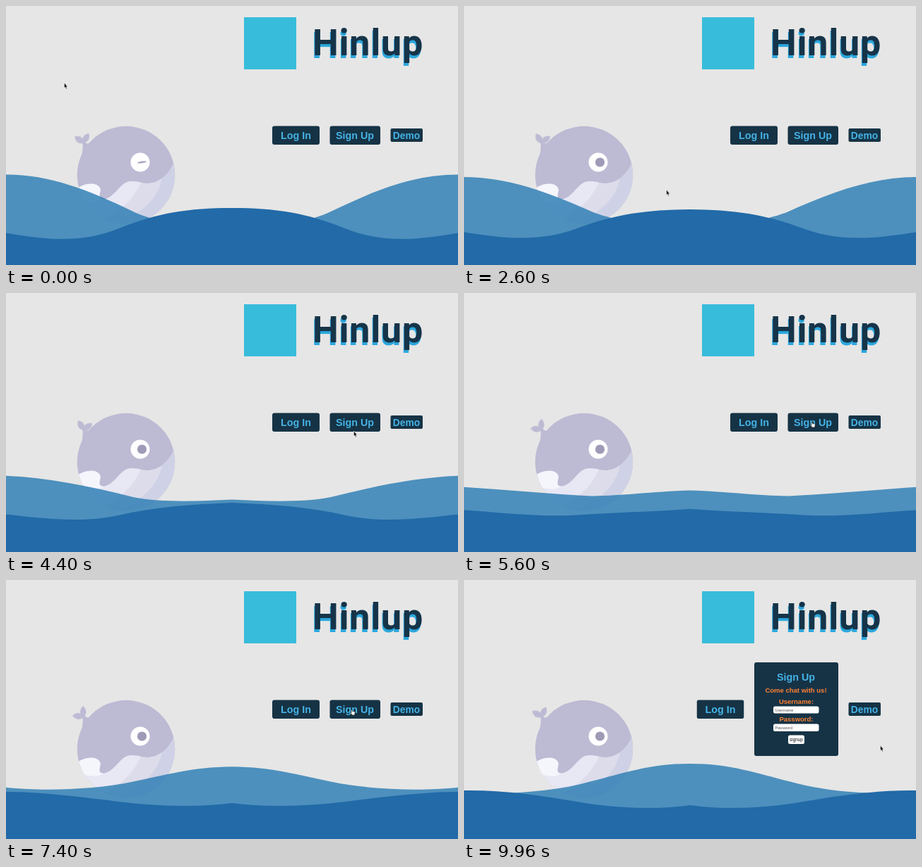
Animation of 640 by 368 pixels, one loop 10000 ms. Source, as an HTML page:

```html
<!DOCTYPE html>
<html lang="en">
<head>
<meta charset="utf-8">
<title>Hinlup</title>
<style>
  :root { --loop: 10s; }
  html, body { margin: 0; height: 100%; overflow: hidden; background: #e6e6e6; }
  svg { display: block; width: 640px; height: 368px; }
  text { font-family: "Liberation Sans", Arial, sans-serif; font-weight: 700; font-size: 14.3px; text-anchor: middle; }
  .brand { font: 700 52px Roboto, sans-serif; letter-spacing: .9px; text-anchor: start; }
  .box { fill: #163345; }
  .label { fill: #45b3e6; }
  .orange { fill: #ff8033; font-size: 9.5px; }
  .field { fill: #fff; }
  .hint { fill: #555; font-weight: 400; font-size: 5.6px; text-anchor: start; }
  .send { fill: #111; font-weight: 400; font-size: 6.4px; }

  /* waves */
  .wave { animation: var(--loop) ease-in-out infinite; }
  .back { fill: #3281b6; fill-opacity: .85; animation-name: back; }
  .front { fill: #226aa8; animation-name: front; }
  @keyframes back {
    0%, 13% {
      d: path("M0 239.5C62 239.5 116 261 180 292C215 309 270 314 320 310C370 314 425 309 460 292C524 261 578 239.5 640 239.5V368H0Z");
    }
    90%, 100% {
      d: path("M0 300C50 306 125 302 180 286C225 275 262 261 320 261C378 261 415 275 460 286C515 302 590 306 640 300V368H0Z");
    }
  }
  @keyframes front {
    0%, 13% {
      d: path("M0 322.5C55 332 106 338 160 316S258 287 320 287C382 287 426 294 480 316S585 332 640 322.5V368H0Z");
    }
    90%, 100% {
      d: path("M0 299C50 298 110 306 160 315S270 327 320 320C370 327 430 324 480 315S590 298 640 299V368H0Z");
    }
  }

  /* whale */
  .tail { transform-origin: 109.5px 195px; animation: wag 1s ease-in-out -1.53s infinite alternate; }
  @keyframes wag {
    from { transform: rotate(12deg); }
    to { transform: rotate(-42deg); }
  }
  .pupil { transform-origin: 192.5px 222px; animation: blink var(--loop) infinite; }
  @keyframes blink {
    0%, .6% { transform: rotate(-8deg) scaleY(.2); }
    1.5%, 99.7% { transform: none; }
    100% { transform: rotate(-8deg) scaleY(.2); }
  }

  /* form and pointer */
  .closed, .opened, .login, .arrow, .hand { animation: var(--loop) step-end infinite; }
  .closed { animation-name: leave; }
  .opened { animation-name: enter; }
  .login { animation-name: shift; }
  .arrow { animation-name: arrow; }
  .hand { animation-name: hand; }
  @keyframes leave { 0% { opacity: 1; } 80%, 100% { opacity: 0; } }
  @keyframes enter { 0% { opacity: 0; } 80%, 100% { opacity: 1; } }
  @keyframes shift { 0% { transform: none; } 80%, 100% { transform: translateX(-47.5px); } }
  @keyframes arrow { 0% { opacity: 1; } 45% { opacity: 0; } 91.5%, 100% { opacity: 1; } }
  @keyframes hand { 0% { opacity: 0; } 45% { opacity: 1; } 91.5%, 100% { opacity: 0; } }
  .pointer { animation: move var(--loop) linear infinite; }
  @keyframes move {
    0%, 4% { transform: translate(82px, 109px); }
    26% { transform: translate(286px, 261px); }
    44% { transform: translate(492px, 196px); }
    50%, 56% { transform: translate(491px, 183px); }
    70%, 87% { transform: translate(488px, 184px); }
    97%, 100% { transform: translate(589px, 235px); }
  }
</style>
</head>
<body>
<svg viewBox="0 0 640 368">
  <defs>
    <clipPath id="round"><circle cx="170" cy="240" r="69.2"/></clipPath>
    <text id="brand" class="brand" x="434" y="70">Hinlup</text>
  </defs>

  <rect x="337" y="16" width="74" height="74" fill="#38bcdb"/>
  <use href="#brand" x="-1" y="3.5" fill="#2ba7dd"/>
  <use href="#brand" fill="#163449"/>

  <g fill="#bdbad4">
    <path class="tail" d="M109.5 195C102 195 99 190 99.500 183C105 183 109 185 109.800 189C111 185 115 182.500 120 183C120.500 190 117 195 109.500 195Z"/>
    <path d="M108 192C111 208 104 220 101 240L130 230 128 184C121 195 114 199 111.500 192Z"/>
    <circle cx="170" cy="240" r="69.2"/>
  </g>
  <g clip-path="url(#round)">
    <path fill="#cfd2e6" d="M238 221C232 238 218 251 200 252C188 252 182 247 172 250C160 254 154 272 138 275L100 265V320H245Z"/>
    <path fill="#dddcea" d="M221 245C214 250 207 252 200 252C188 252 182 247 172 250C160 254 154 272 138 275L100 265V315H145C180 300 212 284 221 245Z"/>
    <path fill="#e8e7f4" d="M191 250.500C184 249 178 248 172 250C160 254 154 272 138 275L100 265V310H125C155 298 180 277 191 250.500Z"/>
    <path fill="#f5f5fc" d="M100 260C111 251 131 249 134 261C133 268 130 274 138 275L128 279 100 276Z"/>
  </g>
  <circle cx="190" cy="222" r="13.5" fill="#fff"/>
  <circle class="pupil" cx="192.5" cy="222" r="6.6" fill="#9d9bb6"/>

  <path class="wave back"/>
  <path class="wave front"/>

  <g class="login">
    <rect class="box" x="377" y="170.5" width="67" height="26.5" rx="3"/>
    <text class="label" x="410.500" y="189">Log In</text>
  </g>
  <g class="closed">
    <rect class="box" x="458.5" y="170.5" width="71.5" height="26.5" rx="3"/>
    <text class="label" x="494" y="189">Sign Up</text>
  </g>
  <rect class="box" x="544.500" y="174" width="45.500" height="19" rx="2"/>
  <text class="label" x="567" y="189" style="font-size:13.8px">Demo</text>

  <g class="opened">
    <rect class="box" x="411" y="117" width="119" height="133" rx="3"/>
    <text class="label" x="470" y="143">Sign Up</text>
    <text class="orange" x="470" y="159.500">Come chat with us!</text>
    <text class="orange" x="470.500" y="175.500">Username:</text>
    <rect class="field" x="438" y="179.500" width="64.500" height="10" rx="2.500"/>
    <text class="hint" x="440.500" y="186.500">Username</text>
    <text class="orange" x="470.500" y="200.500">Password:</text>
    <rect class="field" x="438" y="204.500" width="64.500" height="10.500" rx="2.500"/>
    <text class="hint" x="440.500" y="212">Password</text>
    <rect class="field" x="459" y="220.500" width="23" height="12.500" rx="2.500"/>
    <text class="send" x="470.500" y="228.800">signup</text>
  </g>

  <g class="pointer" stroke-linejoin="round">
    <path class="arrow" d="M.5 0V7.500L2 6.200 3.200 8.800 4.400 8.300 3.300 5.800H5.200Z" fill="#111" stroke="#fff" stroke-width=".5"/>
    <path class="hand" d="M1.300 .5C.5 .5 .5 1.500 .8 2.500L1.200 4.500C0 3.500-.8 4.200 0 5L2 8H5.500L6.200 5V3.500C5.500 2.700 4 2.700 2.600 2.700L2.100 1C2 .7 1.700 .5 1.300 .5Z" fill="#fff" stroke="#222" stroke-width=".7"/>
  </g>
</svg>
</body>
</html>
```
